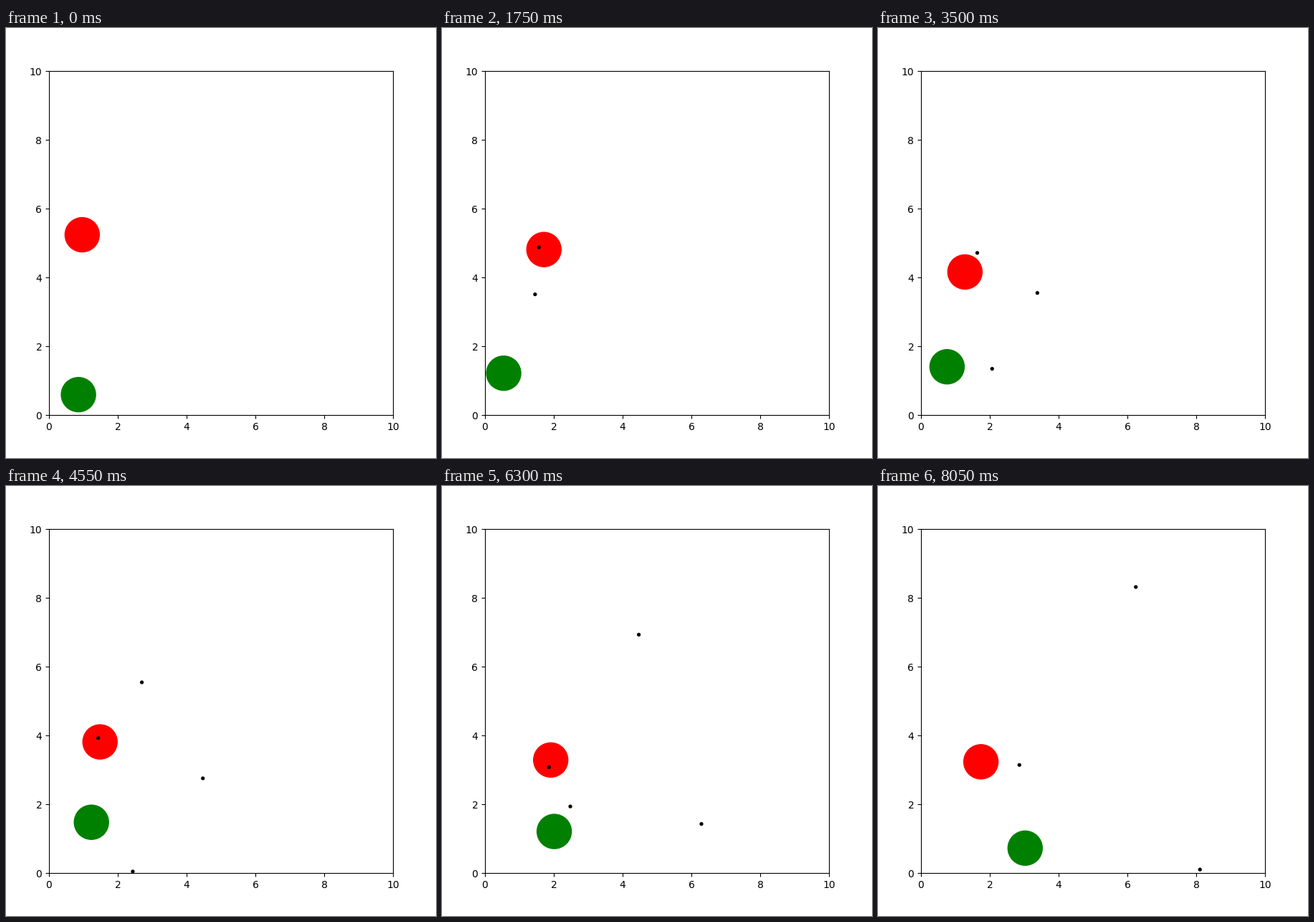
Animation, 600 px wide and 600 px high, one loop 8.4 s. Source, as a matplotlib script:

```python
import numpy as np
import matplotlib.pyplot as plt
from matplotlib.animation import FuncAnimation
from matplotlib.patches import Circle

FRAMES, INTERVAL = 24, 350
RADIUS, SHOT_RADIUS = 0.5, 0.04
SHOT_SPEED, RELOAD = 0.45, 4         # units per frame, frames per shot
HEADINGS = np.radians([-74.2, -36.1, 38.0, -62.1, -62.6, 2.5])

# Turning points of each walk: (frame, x, y).
SHOOTER_TURNS = [(0, 0.965, 5.24), (2, 1.267, 5.0), (5, 1.713, 4.81),
                 (8, 1.28, 4.435), (10, 1.277, 4.158), (12, 1.427, 3.923),
                 (16, 1.652, 3.475), (19, 2.04, 3.19), (20, 1.96, 3.102),
                 (23, 1.742, 3.233)]
TARGET_TURNS = [(0, 0.856, 0.592), (1, 0.86, 0.8), (3, 0.688, 1.021),
                (5, 0.542, 1.215), (7, 0.648, 1.188), (9, 0.63, 1.28),
                (10, 0.758, 1.402), (13, 1.233, 1.475), (16, 1.704, 1.338),
                (17, 1.854, 1.217), (20, 2.329, 1.188), (23, 3.027, 0.723)]


def walk(turns, i):
    """Position at frame i, moving straight between turning points."""
    t, x, y = zip(*turns)
    return np.array([np.interp(i, t, x), np.interp(i, t, y)])


def shot_position(k, i):
    """Each shot leaves from where the shooter stood when it fired."""
    fired = k * RELOAD
    step = SHOT_SPEED * np.array([np.cos(HEADINGS[k]), np.sin(HEADINGS[k])])
    return walk(SHOOTER_TURNS, fired) + (i - fired - 1) * step


fig = plt.figure(figsize=(6, 6), dpi=100)
ax = fig.add_axes([0.1, 0.1, 0.8, 0.8])
ax.set(xlim=(0, 10), ylim=(0, 10))


def disc(radius, color):
    return ax.add_patch(Circle((0, 0), radius, color=color))


shooter = disc(RADIUS, "red")
target = disc(RADIUS, "green")
shots = [disc(SHOT_RADIUS, "black") for _ in HEADINGS]


def update(i):
    shooter.center = walk(SHOOTER_TURNS, i)
    target.center = walk(TARGET_TURNS, i)
    for k, shot in enumerate(shots):
        pos = shot_position(k, i)
        fired = i > k * RELOAD
        inside = np.all((pos >= 0) & (pos <= 10))
        hit = np.hypot(*(pos - target.center)) < RADIUS
        shot.center = pos
        shot.set_visible(bool(fired and inside and not hit))
    return [shooter, target, *shots]


anim = FuncAnimation(fig, update, frames=FRAMES, interval=INTERVAL,
                     init_func=lambda: update(0), repeat=True, repeat_delay=0)
plt.show()
```
